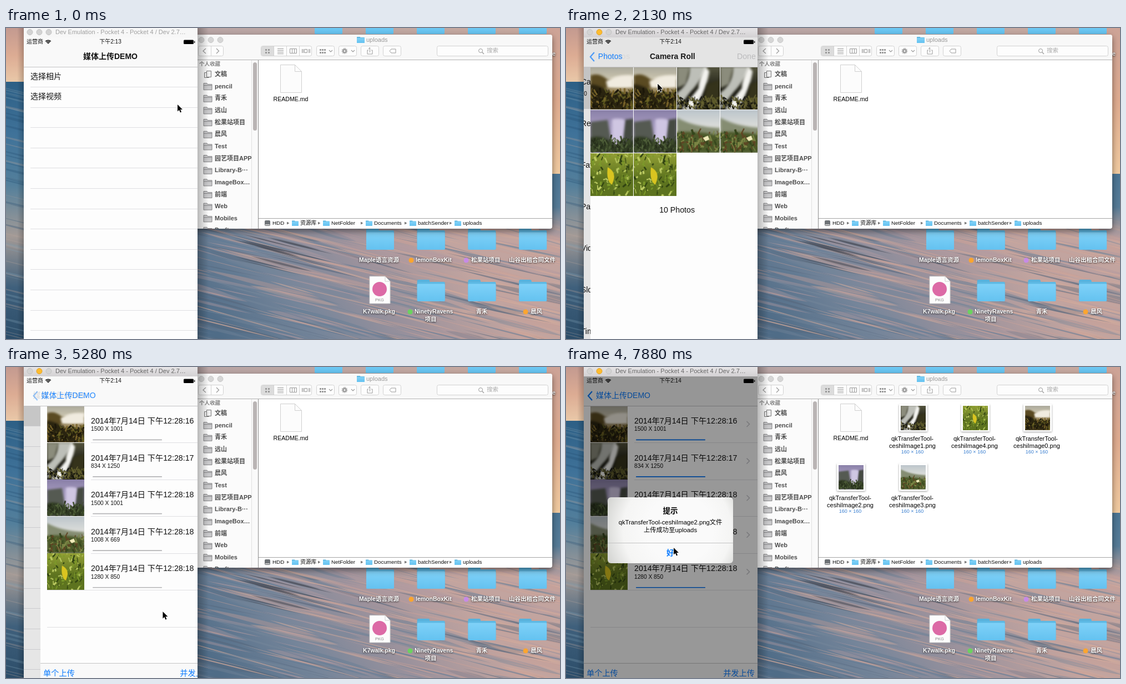
An HTML page with a canvas that plays this animation: 998x561 px, repeating every 8 s.

```html
<!DOCTYPE html>
<html lang="zh">
<head>
<meta charset="utf-8">
<title>Media upload demo</title>
<style>
html, body { margin: 0; height: 100%; overflow: hidden; }
canvas { display: block; }
</style>
</head>
<body>
<canvas id="stage" width="998" height="561"></canvas>
<script>
const W = 998, H = 561, LOOP = 8000, BLUE = '#0a7bff';
const FONT = '"Liberation Sans", "Noto Sans CJK SC", "Noto Sans CJK", sans-serif';
const stage = document.getElementById('stage').getContext('2d');
let ctx = stage;

// ---------- helpers ----------
const clamp = v => Math.max(0, Math.min(1, v));
const ramp = (t, start, length) => clamp((t - start) / length);
const easeOut = u => 1 - (1 - u) ** 3;
const easeInOut = u => (1 - Math.cos(Math.PI * u)) / 2;

function random(seed) {
  return () => (seed = (seed * 16807) % 2147483647) / 2147483647;
}
function offscreen(w, h, paint) {
  const canvas = document.createElement('canvas'), previous = ctx;
  canvas.width = w; canvas.height = h;
  ctx = canvas.getContext('2d');
  paint();
  ctx = previous;
  return canvas;
}
function within(dx, dy, alpha, paint) {
  ctx.save();
  ctx.translate(dx, dy);
  ctx.globalAlpha *= alpha;
  paint();
  ctx.restore();
}
function rect(x, y, w, h, fill) { ctx.fillStyle = fill; ctx.fillRect(x, y, w, h); }
function round(x, y, w, h, r, fill, stroke) {
  ctx.beginPath(); ctx.roundRect(x, y, w, h, r);
  if (fill) { ctx.fillStyle = fill; ctx.fill(); }
  if (stroke) { ctx.strokeStyle = stroke; ctx.lineWidth = 1; ctx.stroke(); }
}
function dot(x, y, r, fill, stroke) { round(x - r, y - r, 2 * r, 2 * r, r, fill, stroke); }
function line(points, color, width = 1) {
  ctx.beginPath();
  for (let i = 0; i < points.length; i += 2) ctx.lineTo(points[i], points[i + 1]);
  ctx.strokeStyle = color; ctx.lineWidth = width; ctx.stroke();
}
function shape(path, fill) { ctx.fillStyle = fill; ctx.fill(new Path2D(path)); }
function gradient(x0, y0, x1, y1, ...stops) {
  const g = ctx.createLinearGradient(x0, y0, x1, y1);
  stops.forEach((c, i) => g.addColorStop(i / (stops.length - 1), c));
  return g;
}
function text(s, x, y, size, color = '#111', align = 'left', weight = 'normal') {
  ctx.font = `${weight} ${size}px ${FONT}`;
  ctx.textAlign = align; ctx.textBaseline = 'middle';
  ctx.fillStyle = color; ctx.fillText(s, x, y);
}
const chevron = (x, y, color, s = 5, width = 1.5) => line([x, y - s, x + s, y, x, y + s], color, width);

// ---------- photos ----------
const scenes = [
  { sky: ['#aaa89b', '#f1e6c6'], leaves: ['#5d5a20', '#1d180a', '#7a642a'], from: 6, parts: [
    ['#5a4a22', 'M0 2Q2 1.2 4 3L10 3V10H0Z'], ['#f0ebdf', 'M3.6 3.4Q6 1.6 10 2V5Q7 5.3 4 5Z'],
    ['#a8966c', 'M3 5H10V6.3H4Z'], ['#2a2410', 'M0 4Q3 4.5 5 6.2L10 6V10H0Z']] },
  { sky: ['#55553f', '#17170f'], leaves: ['#5c5a2a', '#15150e', '#6b6636'], from: 7.5, parts: [
    ['#8b8c7c', 'M0 0H3L2 4L0 5Z'], ['#bdbfb8', 'M3 0H7Q5 4 3 6L0 10V6Q3 4 3 0Z'],
    ['#f3f3ef', 'M6.5 0Q5 3 5 5L1 10H4Q7 5 7.5 1Z'], ['#35331b', 'M7 4L10 3V10H5.5Z']] },
  { sky: ['#8a80a8', '#b7acce'], leaves: ['#50603a', '#262e1a', '#3c4a2a'], from: 7, parts: [
    ['#555a52', 'M0 2.8L4 2.3 5 8 0 9Z'], ['#454a42', 'M8 2.3L10 2V10H7Z'],
    ['#cfc6e2', 'M5 2.2Q6.5 1.8 8 2.3L7.4 8H5.2Z'], ['#2f3a22', 'M0 6.5Q3 5.5 6 8.5L10 7V10H0Z']] },
  { sky: ['#bcc5cb', '#eceae2'], leaves: ['#34461c', '#7d8746', '#5f4524'], from: 5.5, parts: [
    ['#858d72', 'M0 1.8Q4 4 10 4.2V10H0Z'], ['#4c5a2a', 'M0 5.2Q5 4.8 10 6V10H0Z']],
    top: ['#f0ecba', 'M6 6.5L7.2 6L7.5 6.9L6.6 7.3Z'] },
  { sky: ['#93a036', '#5d731f'], leaves: ['#2f4212', '#bccb62', '#7d9a2b'], from: 0, parts: [],
    top: ['#d9c420', 'M4 3.3Q6.4 4.5 5 7.4Q3.6 6.5 4 3.3Z'] }
];
const photos = scenes.map((scene, n) => offscreen(78, 78, () => {
  const rnd = random(n * 77 + 19);
  ctx.scale(7.8, 7.8);
  ctx.filter = 'blur(2px)';
  rect(-1, -1, 12, 12, gradient(0, 0, 0, 6, ...scene.sky));
  scene.parts.forEach(([color, path]) => shape(path, color));
  ctx.filter = 'blur(0.7px)';
  for (let i = 0; i < 120; i++) {
    const x = rnd() * 10, y = scene.from + rnd() * (10 - scene.from);
    line([x, y, x + rnd() * 1.6 - .8, y - rnd() * 1.4], scene.leaves[i % 3], .12 + rnd() * .35);
  }
  if (scene.top) shape(scene.top[1], scene.top[0]);
}));
const photo = (n, x, y, w, h = w) => ctx.drawImage(photos[n], x, y, w, h);

// ---------- desktop ----------
function folder(x, y, w) {
  const h = w * .78;
  round(x, y, w * .45, h / 2, w * .05, '#57b2dd');
  round(x, y + h * .1, w, h * .9, w * .04, '#5db9e4');
  round(x, y + h * .19, w, h * .81, w * .04, gradient(0, y, 0, y + h, '#86d5fa', '#64c2f0'));
}
function page(x, y, w, h, fold) {
  shape(`M${x} ${y}h${w - fold}l${fold} ${fold}v${h - fold}h${-w}z`, '#fcfcfc');
  line([x, y, x + w - fold, y, x + w, y + fold, x + w, y + h, x, y + h, x, y], '#cfcfcf');
  line([x + w - fold, y, x + w - fold, y + fold, x + w, y + fold], '#cfcfcf');
}
// Tapered diagonal brush stroke
function brush(x, y, length, slope, width, color) {
  const dx = length / 2, dy = dx * slope;
  shape(`M${x} ${y}Q${x + dx} ${y + dy - width} ${x + length} ${y + 2 * dy}` +
    `Q${x + dx} ${y + dy + width} ${x} ${y}Z`, color);
}
function wallpaper() {
  rect(0, 0, W, H, gradient(420, 600, 760, 340, '#4f6c87', '#75859a', '#9c929c', '#c2a49f'));
  const rnd = random(421);
  ctx.filter = 'blur(0.6px)';
  for (let i = 0; i < 330; i++) {
    const x = 200 + rnd() * 780, y = 320 + rnd() * 240, fine = i > 90;
    const warm = rnd() < .38 + (x - 345) / 1700 - (y - 460) / 900;
    const colors = warm ? ['#c7a19a', '#b49ba0', '#d6ac9c'] : ['#5f7b95', '#74859a', '#56677c'];
    ctx.globalAlpha = fine ? .55 : .4;
    brush(x, y, 80 + rnd() * 190, .2 + rnd() * .1, fine ? 1 + rnd() * 3 : 5 + rnd() * 9, colors[i % 3]);
  }
  for (let i = 0; i < 16; i++)
    brush(400 + rnd() * 90, 368 + rnd() * 50, 70 + rnd() * 60, .25, 1.5 + rnd() * 3, '#454955');
  ctx.filter = 'none';
  ctx.globalAlpha = 1;
  rect(345, 0, 653, 14, gradient(345, 0, 998, 0, '#b8a5a5', '#c8a99e'));
  rect(960, 0, 38, 263, gradient(0, 0, 0, 263, '#cda397', '#dfab8f', '#f1cba0'));
  rect(960, 263, 38, 120, gradient(0, 263, 0, 383, '#4b7594', '#557b97', '#6f839600'));
  rect(0, 0, 32, 97, gradient(0, 0, 0, 97, '#c39a90', '#dcab93', '#e9c8a8'));
  rect(0, 97, 32, 464, gradient(0, 97, 0, 561, '#2d5f85', '#3f7299', '#537f9b', '#a39a96', '#3f607c', '#2c4d69'));
  ctx.globalAlpha = .3;
  for (let i = 0; i < 50; i++)
    brush(-20, 100 + rnd() * 450, 90, .25, 1 + rnd() * 4, ['#7fa0b2', '#244d70', '#b3a49c'][i % 3]);
  ctx.globalAlpha = 1;
}
function label(s, x, y, align = 'center') {
  ctx.shadowColor = '#000c'; ctx.shadowBlur = 3; ctx.shadowOffsetY = 1;
  text(s, x, y, 10.5, '#fff', align, 'bold');
  ctx.shadowColor = 'transparent';
}
function desktop() {
  wallpaper();
  for (let i = 0; i < 5; i++) folder(556 + 92 * i, -28, 50);
  label('e', 987, 47);
  for (let i = 0; i < 4; i++) folder(649 + 91.7 * i, 361, 50);
  for (let i = 1; i < 4; i++) folder(649 + 91.7 * i, 454, 50);
  page(655, 448, 37, 49, 9);
  dot(673, 471, 13, '#dc6aa6');
  text('PKG', 673, 491, 7.5, '#888', 'center');
  label('Maple语言资源', 672, 419);
  label('lemonBoxKit', 738, 419, 'left');
  label('松果站项目', 838, 419, 'left');
  label('山谷出租合同文件', 948, 419);
  label('K7walk.pkg', 672, 512);
  label('NinetyRavens', 736, 512, 'left');
  label('项目', 765, 526);
  label('青禾', 857, 512);
  label('晨风', 945, 512, 'left');
  dot(730, 419, 4.5, '#fba52f'); dot(829, 419, 4.5, '#c78be6');
  dot(728, 512, 4.5, '#6bd35f'); dot(936, 512, 4.5, '#fba52f');
}

// ---------- file window ----------
function toolbar() {
  [352, 369, 386].forEach(x => dot(x, 21.5, 5, '#d6d6d6', '#c6c6c6'));
  folder(632, 16, 14);
  text('uploads', 649, 22, 11, '#999');
  const edge = '#d2d2d2', ink = '#9a9a9a';
  const boxes = [[346, 46], [459, 92], [559, 33], [599, 33], [639, 33], [679, 33], [776, 201]];
  boxes.forEach(([x, w]) => round(x + .5, 32.5, w - 1, 18, 3, '#fdfdfd', edge));
  rect(460, 33, 22, 17, '#dcdcdc');
  [369.5, 482.5, 505.5, 528.5].forEach(x => line([x, 33, x, 50], edge));
  line([360, 37, 355, 41.5, 360, 46], ink, 1.3);
  chevron(379, 41.5, ink, 4.5, 1.3);
  for (let i = 0; i < 4; i++) rect(467 + i % 2 * 5, 38 + (i >> 1) * 5, 3, 3, ink);
  for (let i = 0; i < 4; i++) rect(489, 37 + i * 3, 11, 1, ink);
  for (let i = 0; i < 3; i++) round(511.5 + i * 4, 37.5, 4, 8, 0, null, ink);
  round(537.5, 38.5, 5, 6, 0, null, ink);
  [533, 535, 545, 547].forEach(x => rect(x, 38, 1, 7, ink));
  for (let i = 0; i < 6; i++) rect(565 + i % 3 * 4, 38 + (i / 3 | 0) * 5, 3, 3, ink);
  [585, 625].forEach(x => line([x - 3, 40, x, 43, x + 3, 40], ink, 1.2));
  ctx.setLineDash([2, 1.5]); dot(610, 41.5, 5, null, ink); ctx.setLineDash([]);
  dot(610, 41.5, 4, ink); dot(610, 41.5, 1.5, '#fdfdfd');
  line([653, 40, 651, 40, 651, 47, 660, 47, 660, 40, 658, 40], ink);
  line([655.5, 44, 655.5, 35, 653, 38], ink);
  line([691, 41.5, 694, 38, 702, 38, 702, 45, 694, 45, 691, 41.5], ink);
  dot(855, 41, 3.5, null, ink); line([857.5, 43.5, 861, 47], ink, 1.3);
  text('搜索', 866, 41.5, 10.5, '#aaa');
}
function sidebar() {
  rect(345, 58, 98, 304, '#fbfbfb');
  text('个人收藏', 348, 65, 9.5, '#858585', 'left', 'bold');
  const items = ['文稿', 'pencil', '青禾', '远山', '松果站项目', '晨风', 'Test', '园艺项目APP',
    'Library-B···', 'ImageBox…', '前端', 'Web', 'Mobiles', 'Drafts'];
  items.forEach((item, i) => {
    const y = 84 + 21.65 * i;
    if (i) {
      shape(`M356 ${y - 6}h6l1.5 2h7.5v10h-15z`, '#c9c9cb');
      line([356, y - 6, 362, y - 6, 363.5, y - 4, 371, y - 4, 371, y + 6, 356, y + 6, 356, y - 6], '#858587');
      line([356, y - 2, 371, y - 2], '#858587');
    } else {
      round(357.5, 80.5, 8, 9, 0, '#eee', '#777'); round(361.5, 77.5, 8, 11, 0, '#eee', '#777');
    }
    text(item, 376, y, 11, '#4c4c4c', 'left', 'bold');
  });
  rect(443, 58, 11, 304, '#fafafa');
  rect(442, 58, 1, 304, '#e2e2e2');
  round(445, 62, 7, 123, 3.5, '#b9b4b4');
  rect(454, 58, 1, 304, '#8d8d8d');
}
function fileWindow() {
  ctx.shadowColor = '#0007'; ctx.shadowBlur = 12; ctx.shadowOffsetY = 4;
  round(300, 12, 684, 350, 4, '#fff');
  ctx.shadowColor = 'transparent';
  ctx.save();
  ctx.beginPath(); ctx.roundRect(300, 12, 684, 350, 4); ctx.clip();
  rect(300, 12, 684, 46, '#f8f8f8');
  toolbar();
  rect(300, 57, 684, 1, '#b2b2b2');
  sidebar();
  rect(455, 343, 529, 1, '#a5a5a5');
  round(466, 347, 10, 10, 2, '#6f7377'); rect(467, 354, 8, 2, '#c8c8c8');
  [['HDD', 480], ['资源库', 530], ['NetFolder', 586], ['Documents', 663], ['batchSender', 742], ['uploads', 823]]
    .forEach(([name, x], i) => {
      if (i) {
        folder(x - 15, 347.5, 12);
        shape(`M${x - 24} 349.5l4.5 2.5l-4.5 2.5z`, '#777');
      }
      text(name, x, 352.5, 9.8);
    });
  page(494.5, 66.5, 38, 50, 12);
  text('README.md', 513, 129.5, 10.6, '#000', 'center');
  ctx.restore();
}
function uploadedFiles(withSizes) {
  [1, 4, 0, 2, 3].forEach((n, i) => {
    const x = i < 3 ? 625 + 112 * i : 513 + 112 * (i - 3), y = i < 3 ? 91.5 : 198.5;
    ctx.shadowColor = '#0006'; ctx.shadowBlur = 3; ctx.shadowOffsetY = 1;
    rect(x - 25, y - 25, 51, 50, '#fff');
    ctx.shadowColor = 'transparent';
    photo(n, x - 22, y - 22, 45, 44);
    text('qkTransferTool-', x - 1, y + 38, 11, '#000', 'center');
    text(`ceshiImage${n}.png`, x - 1, y + 51.5, 11, '#000', 'center');
    if (withSizes) text('160 × 160', x - 1, y + 62.5, 9, '#3a7fd0', 'center');
  });
}

// ---------- phone pages ----------
const separator = (x, y) => rect(x, y, 345 - x, 1, '#dfdfe2');
const body = () => rect(32, 17, 313, 544, '#fdfdfd');
const heading = s => text(s, 188, 52, 14, '#111', 'center', 'bold');

function backButton(s, p) {
  within(0, 0, p ** 8, () => line([47, 44, 40, 52, 47, 60], BLUE, 2.2));
  text(s, 54, 52, 14, BLUE);
}
function menuPage(selected) {
  body();
  if (selected) rect(32, 70, 313, 37, '#d9d9d9');
  text('选择相片', 44, 88, 14); text('选择视频', 44, 124.5, 14);
  for (let i = 0; i < 13; i++) separator(44, Math.round(106 + 36.6 * i));
}
function albumPage(selected) {
  body();
  if (selected) rect(32, 71, 313, 75, '#d9d9d9');
  ['Camera Roll', 'Recently Added', 'Favorites', 'Panoramas', 'Videos', 'Slo-mo', 'Time-lapse'].forEach((name, i) => {
    const y = 75 * i;
    rect(48, y + 77, 52, 1, '#d8d8d8'); rect(46.5, y + 79, 55, 1, '#dedede');
    if (i) {
      rect(45, y + 80, 58, 58, '#e7e7e7');
      round(59.5, y + 98.5, 25, 18, 0, null, '#c9c9c9');
      round(64.5, y + 103.5, 25, 18, 0, '#e7e7e7', '#c9c9c9');
    } else {
      photo(2, 45, 80, 58);
      rect(48, 122, 11, 9, '#fff'); round(50.5, 124.5, 11, 9, 0, '#fff', '#888');
    }
    text(name, 117, y + 98, 14.3);
    text(i ? '0' : '10', 117, y + 119, 10);
    chevron(325.5, y + 108, '#c7c7cc');
  });
}
const picks = [[1, 2550], [2, 2980], [5, 3250], [6, 3480], [9, 3950]];
const picked = t => picks.filter(([, at]) => t >= at).map(([cell]) => cell);

function gridPage(t) {
  body();
  const chosen = picked(t);
  for (let i = 0; i < 10; i++) {
    const x = 32 + i % 4 * 78, y = 70 + (i >> 2) * 77.8;
    photo(i >> 1, x, y, 77.3);
    if (!chosen.includes(i)) continue;
    rect(x, y, 77.3, 77.3, '#ffffff4d');
    dot(x + 65, y + 64.5, 10, '#fff'); dot(x + 65, y + 64.5, 9, BLUE);
    line([x + 60.5, y + 64.5, x + 63.5, y + 68, x + 70, y + 61], '#fff', 1.4);
  }
  text('10 Photos', 188, 329, 14.2, '#111', 'center');
}
function uploadPage(t) {
  body();
  const sizes = ['1500 X 1001', '834 X 1250', '1500 X 1001', '1008 X 669', '1280 X 850'];
  sizes.forEach((size, i) => {
    const y = 70 + 66.6 * i;
    photo(i, 44, y, 67, 66);
    text(`2014年7月14日 下午12:28:${Math.min(16 + i, 18)}`, 123, y + 28, 14.2);
    text(size, 123, y + 42.5, 10.2);
    round(126, y + 60.5, 125, 1.7, 1, '#b5b5b7');
    const done = ramp(t, i === 2 ? 6450 : 6200, 150);
    if (done) round(126, y + 60.5, 125 * done, 1.7, 1, BLUE);
    chevron(325.5, y + 33, '#c7c7cc');
    separator(i < 4 ? 123 : 44, Math.round(y + 66));
  });
  separator(44, 469);
  rect(32, 534, 313, 27, '#f9f9f9'); rect(32, 534, 313, 1, '#c4c4c4');
  text('单个上传', 37, 553.5, 14.2, BLUE);
  text('并发上传', 340, 553.5, 14.2, t > 6200 && t < 6700 ? '#b4d5f8' : BLUE, 'right');
}

// Page transition: p runs from 0 (back page) to 1 (front page).
function push(p, back, front, backNav, frontNav, grey = 0) {
  if (p < 1) within(-94 * p, 0, 1, back);
  if (p > 0) {
    if (p < 1) rect(32, 17, 313, 544, `rgba(0,0,0,${.1 * p})`);
    within(313 * (1 - p), 0, 1, front);
  }
  const level = 249 - grey * p;
  rect(32, 17, 313, 53, `rgb(${level},${level},${level})`);
  rect(32, 70, 313, 1, '#c2c2c4');
  within(-100 * p, 0, 1 - p, backNav);
  within(100 * (1 - p), 0, p, () => frontNav(p));
}
function picker(t) {
  const count = picked(t).length;
  push(easeOut(ramp(t, 1800, 500)),
    () => albumPage(t >= 1750), () => gridPage(t),
    () => {
      text('Cancel', 39, 52, 14, BLUE); heading('Photos');
      text('Done', 338, 52, 14, '#c9c9cb', 'right');
    },
    p => {
      backButton('Photos', p);
      heading(count ? `${count} Photo${count > 1 ? 's' : ''} Selected` : 'Camera Roll');
      text('Done', 338, 52, 14.2, !count ? '#b9b9bb' : t < 4450 ? BLUE : '#a9c6e8', 'right');
    }, 22);
}
function statusBar(t) {
  text('运营商', 37, 25.5, 10);
  for (let r = 2; r < 8; r += 2.4) {
    ctx.beginPath(); ctx.arc(76, 29, r, -2.35, -.8);
    ctx.strokeStyle = '#111'; ctx.lineWidth = 1.6; ctx.stroke();
  }
  text(t < 790 ? '下午2:13' : '下午2:14', 188, 25.5, 10, '#111', 'center');
  round(320, 21.5, 18, 7.5, 1.5, '#000'); rect(339, 23.5, 1.3, 3.5, '#000');
}
function alertBox() {
  const glow = ctx.createRadialGradient(205, 292, 60, 195, 294, 135);
  glow.addColorStop(0, '#fafafa'); glow.addColorStop(.5, '#f5f5f4'); glow.addColorStop(1, '#d0d1ce');
  round(75, 235, 226, 119, 6, glow);
  text('提示', 188, 260, 13.5, '#000', 'center', 'bold');
  text('qkTransferTool-ceshiImage2.png文件', 188, 281, 11.3, '#000', 'center');
  text('上传成功至uploads', 188, 294.5, 11.3, '#000', 'center');
  rect(75, 317, 226, 1, '#c3c3c3');
  text('好', 188, 336.5, 14, BLUE, 'center', 'bold');
}
function phone(t) {
  const active = t >= 790;
  rect(345, 0, 20, H, gradient(345, 0, 365, 0, '#0004', '#0000'));
  rect(20, 0, 12, H, gradient(32, 0, 20, 0, '#0003', '#0000'));
  rect(32, 0, 313, 17, active ? gradient(0, 0, 0, 17, '#e6e4e6', '#d3d1d3') : '#f7f7f7');
  [43, 60, 77].forEach((x, i) =>
    dot(x, 7.5, 5, active && i === 1 ? '#fdbc2f' : '#d3d3d3', active && i === 1 ? '#e0a125' : '#c2c2c2'));
  text('Dev Emulation - Pocket 4 - Pocket 4 / Dev 2.7…', 89, 8, 11, active ? '#666' : '#a0a0a0');

  ctx.save();
  ctx.beginPath(); ctx.rect(32, 17, 313, 544); ctx.clip();
  push(easeOut(ramp(t, 5010, 500)), () => menuPage(active), () => uploadPage(t),
    () => heading('媒体上传DEMO'), p => backButton('媒体上传DEMO', p));
  const drop = 1 - easeOut(ramp(t, 900, 500)) + easeInOut(ramp(t, 4540, 320));
  if (drop < 1) within(0, 544 * drop, 1, () => picker(t));
  statusBar(t);
  const shown = easeOut(ramp(t, 6620, 300));
  if (shown) within(0, 0, shown, () => {
    rect(32, 17, 313, 544, 'rgba(0,0,0,.4)');
    alertBox();
  });
  ctx.restore();
}

// ---------- pointer ----------
const track = [[0, 309, 138], [49, 309, 138], [50, 250, 116], [230, 250, 116], [640, 172, 94], [1700, 172, 95],
  [2460, 160, 105], [2550, 160, 105], [2830, 225, 108], [2980, 225, 108], [3030, 182, 153], [3220, 155, 180],
  [3450, 230, 185], [3560, 300, 190], [3780, 150, 255], [3950, 150, 255], [4450, 328, 66], [4870, 328, 66],
  [5280, 283, 441], [5700, 49, 540], [5850, 49, 540], [6030, 314, 542], [6200, 314, 542], [6380, 405, 439],
  [6600, 405, 439], [7640, 194, 326], [LOOP, 194, 326]];
function pointer(t) {
  const i = track.findIndex(([at]) => at > t);
  const [t0, x0, y0] = track[i - 1], [t1, x1, y1] = track[i];
  const u = ramp(t, t0, t1 - t0);
  within(x0 + (x1 - x0) * u, y0 + (y1 - y0) * u, 1, () => {
    const arrow = new Path2D('M0 0V12.5L2.9 9.8 5 14.5 7 13.6 5 9H9Z');
    ctx.strokeStyle = '#fff'; ctx.lineWidth = 1.6; ctx.stroke(arrow);
    ctx.fillStyle = '#000'; ctx.fill(arrow);
  });
}

const backdrop = offscreen(W, H, () => { desktop(); fileWindow(); });
const start = performance.now();
function frame() {
  const t = (performance.now() - start) % LOOP;
  ctx.drawImage(backdrop, 0, 0);
  if (t >= 7080) uploadedFiles(t >= 7350);
  phone(t);
  pointer(t);
  requestAnimationFrame(frame);
}
frame();
</script>
</body>
</html>
```
